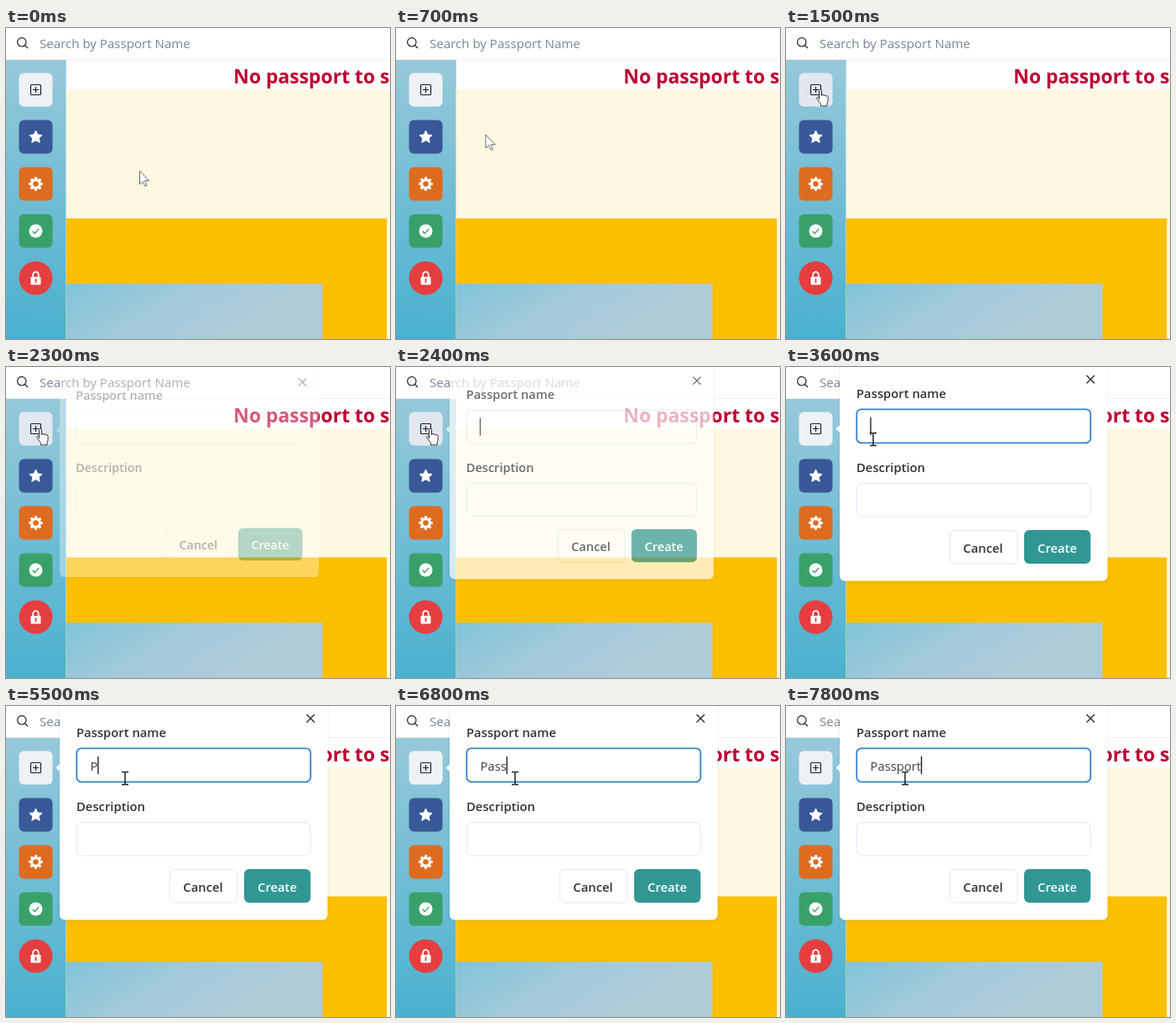
Recreate the animation shown at these times as an HTML page. Size 458 by 370 pixels, loop 8 s.

```html
<!DOCTYPE html>
<html lang="en">
<head>
<meta charset="utf-8">
<title>Create passport</title>
<style>
  html, body { margin: 0; width: 100%; height: 100%; overflow: hidden; }
  svg { display: block; font: 15.1px "Open Sans", "Noto Sans", sans-serif; }
  .label { font-size: 14.8px; font-weight: 600; fill: #2f333b; }
  .box { fill: none; stroke: #e2e8f0; }
  .line { fill: none; stroke: #1a202c; stroke-width: 1.2; }
  .icon { fill: #fff; }
</style>
</head>
<body>
<svg width="458" height="370" viewBox="0 0 458 370">
  <defs>
    <linearGradient id="side" x2="0" y2="1">
      <stop stop-color="#97c9da"/><stop offset="1" stop-color="#49b1cf"/>
    </linearGradient>
    <linearGradient id="panel" x2=".85" y2=".3">
      <stop stop-color="#7fc4d9"/><stop offset=".55" stop-color="#a2cad9"/><stop offset="1" stop-color="#aecbd8"/>
    </linearGradient>
    <filter id="shadow" x="-10%" y="-10%" width="120%" height="120%">
      <feDropShadow dx="0" dy="1" stdDeviation="1.5" flood-opacity=".14"/>
    </filter>
  </defs>

  <rect width="458" height="370" fill="#fffffd"/>
  <rect y="37.5" width="71.7" height="333" fill="url(#side)"/>
  <rect x="71.7" y="73.5" width="387" height="297" fill="#fff8e1"/>
  <rect x="71.7" y="226.5" width="382.6" height="144" fill="#fcbf02"/>
  <rect x="71.7" y="304.2" width="305.8" height="66" fill="url(#panel)"/>
  <path d="M0 37.5H458" stroke="#edf1f5"/>
  <g class="line"><circle cx="18.8" cy="16.8" r="5.2"/><path d="M22.6 20.6L26 24"/></g>
  <text x="40" y="24.3" fill="#76879a">Search by Passport Name</text>
  <text x="271.3" y="66" font-size="22.9" font-weight="700" fill="#be0032">No passport to show</text>

  <g transform="translate(35.5 73.5)">
    <rect id="add" x="-20" y="-20" width="40" height="40" rx="6"/>
    <g class="line"><rect x="-6" y="-6" width="12" height="12" rx="1"/><path d="M-3.5 0h7M0-3.5v7"/></g>
  </g>
  <g transform="translate(35.5 129.5)">
    <rect x="-20" y="-20" width="40" height="40" rx="6" fill="#385898"/>
    <path class="icon" stroke="#fff" stroke-linejoin="round" d="M0-7.5L2.3-2.6 7.6-2 3.7 1.6 4.7 6.8 0 4.2-4.7 6.8-3.7 1.6-7.6-2-2.3-2.6z"/>
  </g>
  <g transform="translate(35.5 185.5)">
    <rect x="-20" y="-20" width="40" height="40" rx="6" fill="#dd6b20"/>
    <g fill="none" stroke="#fff"><circle r="4.9" stroke-width="3.2"/>
      <circle r="6.8" stroke-width="3" stroke-dasharray="2.9 2.44" stroke-dashoffset="1.45"/></g>
  </g>
  <g transform="translate(35.5 241.5)">
    <rect x="-20" y="-20" width="40" height="40" rx="6" fill="#38a169"/>
    <circle class="icon" r="8"/>
    <path d="M-3.8.3l2.6 2.7 5-5.6" fill="none" stroke="#38a169" stroke-width="1.4"/>
  </g>
  <g transform="translate(35.5 297.5)">
    <circle r="20" fill="#e53e3e"/>
    <rect class="icon" x="-6" y="-1.5" width="12" height="9.5" rx="1.2"/>
    <path d="M-3.3-1v-3a3.3 3.3 0 0 1 6.6 0v3" fill="none" stroke="#fff" stroke-width="1.8"/>
    <path d="M0 1.5v3.5" stroke="#e53e3e" stroke-width="1.8" stroke-linecap="round"/>
  </g>

  <g id="popover">
    <path d="M59.5 73.5l6-6v12z" fill="#fffffd"/>
    <rect x="64" y="-19" width="319.5" height="273.5" rx="6" fill="#fffffd" filter="url(#shadow)"/>
    <path class="line" d="M358.5 10l9.5 9.5m0-9.5l-9.5 9.5"/>
    <text class="label" x="84" y="36.8">Passport name</text>
    <rect class="box" x="84.5" y="50.5" width="278.5" height="40" rx="5.5"/>
    <rect id="focus" x="84.3" y="50.3" width="279" height="40" rx="5.5" fill="none" stroke="#3182ce" stroke-width="1.8"/>
    <text id="value" x="100.5" y="77" font-size="14.8" fill="#3a414d"></text>
    <rect id="caret" y="60" width="1.4" height="21" fill="#222"/>
    <text class="label" x="84" y="124.8">Description</text>
    <rect class="box" x="84.5" y="138.5" width="278.5" height="39.5" rx="5.5"/>
    <rect class="box" x="195.2" y="194.5" width="81" height="39.5" rx="5.5"/>
    <text class="label" x="211.3" y="220.8">Cancel</text>
    <rect x="284" y="194" width="79.3" height="40" rx="6" fill="#319795"/>
    <text class="label" x="300" y="220.8" style="fill:#fff">Create</text>
  </g>

  <g id="cursor" fill="#fff" stroke="#222" stroke-width=".9" stroke-linejoin="round">
    <path id="arrow" stroke="#445" stroke-width=".8" d="M0 0V16l3.7-3.5 2.5 5.6 2.3-1-2.4-5.4h5.2z"/>
    <path id="hand" d="M-1.5 12V1.5a1.5 1.5 0 0 1 3 0V7.5q.3-1.3 1.5-1.2t1.3 1.4q.2-1 1.3-.8t1.3 1.4q.3-.9 1.2-.6t1 1.6v3.5q0 2-1 3.5v3.5h-7.6v-2.5q-2-2-4.3-5.8q-.9-1.6.2-2.2t2.1.7z"/>
    <path id="beam" fill="none" stroke-width="1.5" d="M-4-7.5h3l1 1 1-1h3M0-6.5v13M-4 7.5h3l1-1 1 1h3"/>
  </g>
</svg>
<script>
const LOOP = 8000, OPEN = 2200, FOCUS = 2350, BLINK = 530;
const WORD = 'Passport';
const keyTimes = [5500, 6000, 6400, 6700, 7000, 7300, 7500, 7700];
// [start, end, x, y] of each pointer move
const moves = [[100, 1400, 41, 73], [3150, 3600, 104, 86], [4000, 4500, 142, 86]];

const $ = id => document.getElementById(id);
const progress = (t, a, b) => Math.min(1, Math.max(0, (t - a) / (b - a)));
const smooth = p => p * p * (3 - 2 * p);

function pointer(t) {
  let x = 159.5, y = 170;
  for (const [a, b, toX, toY] of moves) {
    const p = smooth(progress(t, a, b));
    x += (toX - x) * p;
    y += (toY - y) * p;
  }
  return [x, y];
}

function draw(t) {
  const [x, y] = pointer(t);
  const onButton = x < 55.5 && y > 53.5 && y < 93.5;
  const onInput = t > OPEN && x > 84 && y > 50 && y < 91;
  const shape = onButton ? 'hand' : onInput ? 'beam' : 'arrow';
  for (const id of ['arrow', 'hand', 'beam']) $(id).style.display = id === shape ? '' : 'none';
  $('cursor').setAttribute('transform', `translate(${x} ${y})`);
  $('add').setAttribute('fill', onButton ? '#e2e8f0' : '#edf2f7');

  const open = progress(t, OPEN, OPEN + 285);
  $('popover').setAttribute('opacity', open);
  $('popover').setAttribute('transform', `translate(64 118) scale(${0.95 + 0.05 * open}) translate(-64 -118)`);
  $('focus').setAttribute('opacity', progress(t, 2400, 2600));

  const typed = keyTimes.filter(k => k <= t);
  const value = $('value');
  value.textContent = WORD.slice(0, typed.length);
  const since = t - (typed.at(-1) ?? FOCUS);
  const caretOn = since >= 0 && Math.floor(since / BLINK) % 2 === 0;
  $('caret').style.display = caretOn ? '' : 'none';
  $('caret').setAttribute('x', 100.3 + (typed.length ? value.getComputedTextLength() : 0));
}

function tick() {
  draw(performance.now() % LOOP);
  requestAnimationFrame(tick);
}
tick();
</script>
</body>
</html>
```
